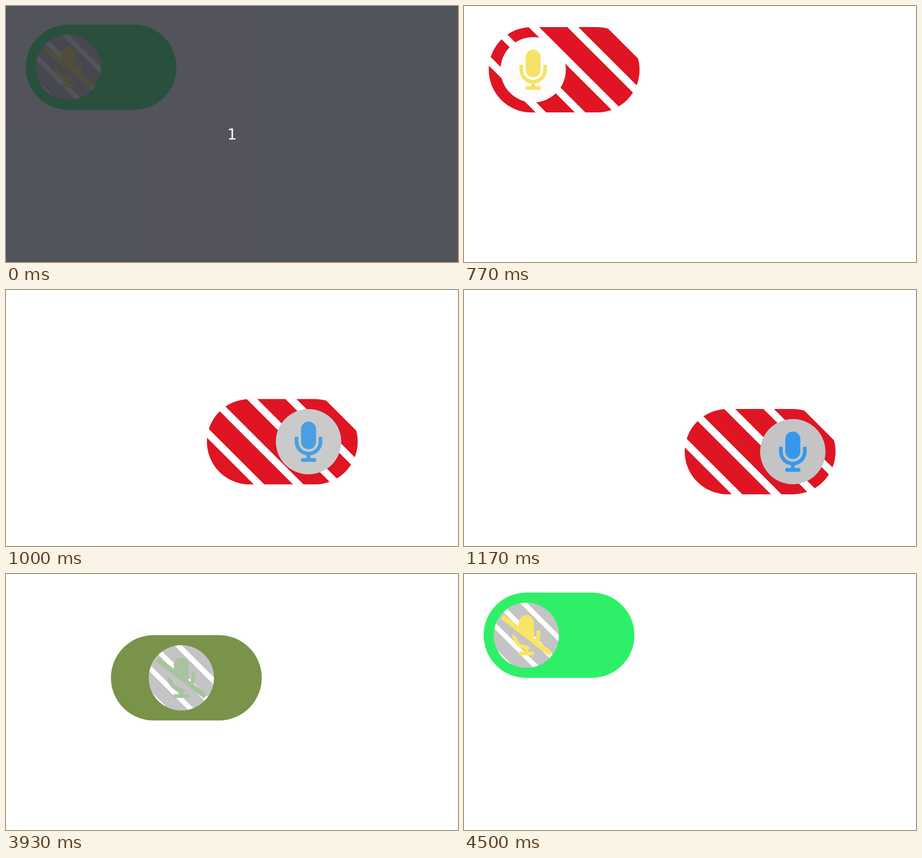
An HTML page that plays this animation: 899x510 px, repeating every 6.96 s.

```html
<!DOCTYPE html>
<html lang="en">
<head>
<meta charset="utf-8">
<title>Microphone switch</title>
<style>
  html, body { margin: 0; width: 100%; height: 100%; overflow: hidden; background: #fff; }
  #toggle { position: absolute; left: 39px; top: 37px; width: 300px; height: 170px; border-radius: 85px; }
  #knob { position: absolute; left: 20px; top: 20px; width: 130px; height: 130px; border-radius: 50%; }
  #toggle.on {
    background: repeating-linear-gradient(45deg, #df1524 26px 66px, #fff 66px 81px);
  }
  #toggle:not(.on) #knob {
    background: repeating-linear-gradient(45deg, #c4c4c4 30px 56px, #fff 56px 66px);
  }
  svg { position: absolute; left: 15px; top: 25px; width: 100px; height: 80px; overflow: visible; }
  .on .muted, :not(.on) > #knob .live { display: none; }
  #countdown {
    position: absolute; inset: 0; display: flex; align-items: center; justify-content: center;
    background: rgba(39, 41, 50, .8); color: #fff; font: 30px "DejaVu Sans", sans-serif;
  }
</style>
</head>
<body>
<div id="toggle">
  <div id="knob">
    <svg id="mic" viewBox="0 0 640 512">
      <g class="live">
        <rect x="224" width="192" height="352" rx="96"/>
        <path d="M160 192h16a16 16 0 0 1 16 16v48a128 128 0 0 0 256 0v-48a16 16 0 0 1 16-16h16a16 16 0 0 1 16 16v48a176 176 0 0 1-352 0v-48a16 16 0 0 1 16-16z"/>
        <path d="M296 425h48v50h-48z"/>
        <rect x="224" y="464" width="192" height="48" rx="16"/>
      </g>
      <g class="muted">
        <path d="M45.5 3.4 633.8 458.1a16 16 0 0 1 2.8 22.5L617 505.8a16 16 0 0 1-22.5 2.8L6.2 53.9a16 16 0 0 1-2.8-22.5L23 6.2a16 16 0 0 1 22.5-2.8z"/>
        <path d="M224 141.4V96a96 96 0 0 1 192 0v160q0 15-5.3 29.7z"/>
        <path d="M437.3 306.2q10.7-24 10.7-50.2v-48a16 16 0 0 1 16-16h16a16 16 0 0 1 16 16v48q0 43-20 80.1z"/>
        <path d="M296 464v-34C208 418 144 338 144 248v-6.7l52 40.2c12 53.5 55 96.5 111.2 101.9q10.400.8 20.4-.2l50.1 38.7q-16.700 6-33.7 8.300v33.800z"/>
        <rect x="224" y="464" width="192" height="48" rx="16"/>
      </g>
    </svg>
  </div>
</div>
<div id="countdown">1</div>
<script>
  const LOOP = 6960, FPS = 30, DURATION = 400, ON_AT = 750, OFF_AT = 3800;
  const RED = [223, 21, 36], GREEN = [46, 240, 104];
  const YELLOW = [251, 228, 100], BLUE = [54, 152, 236];
  const WHITE = [255, 255, 255], GRAY = [196, 196, 196];
  const [toggle, knob, mic, countdown] =
    ['toggle', 'knob', 'mic', 'countdown'].map(id => document.getElementById(id));

  const mix = (a, b, p) => `rgb(${a.map((v, i) => Math.round(v + (b[i] - v) * p))})`;

  // The CSS "ease" curve: cubic-bezier(.25, .1, .25, 1)
  function ease(x) {
    if (x <= 0) return 0;
    if (x >= 1) return 1;
    let low = 0, high = 1, s;
    for (let i = 0; i < 24; i++) {
      s = (low + high) / 2;
      if (.75 * s * (1 - s) + s ** 3 < x) low = s; else high = s;
    }
    return .3 * s * (1 - s) ** 2 + 3 * s * s * (1 - s) + s ** 3;
  }

  function render(ms) {
    // Frames run at 30 per second, shown on a 10 ms clock
    const frame = Math.floor((Math.floor(ms / 10) * 10 + 5) * FPS / 1000);
    const time = frame * 1000 / FPS;
    const on = time >= ON_AT && time < OFF_AT - 1;
    const p = ease((time - ON_AT) / DURATION) - ease((time - OFF_AT) / DURATION);

    toggle.className = on ? 'on' : '';
    toggle.style.transform = `translate(${400 * p}px, ${200 * p}px)`;
    toggle.style.backgroundColor = on ? '' : mix(GREEN, RED, p);
    knob.style.transform = `translateX(${130 * p}px)`;
    knob.style.backgroundColor = on ? mix(WHITE, GRAY, p) : '';
    mic.style.fill = mix(YELLOW, BLUE, p);
    countdown.style.display = frame === 0 ? '' : 'none';
  }

  const start = performance.now();
  function tick() {
    render((performance.now() - start) % LOOP);
    requestAnimationFrame(tick);
  }
  tick();
</script>
</body>
</html>
```
